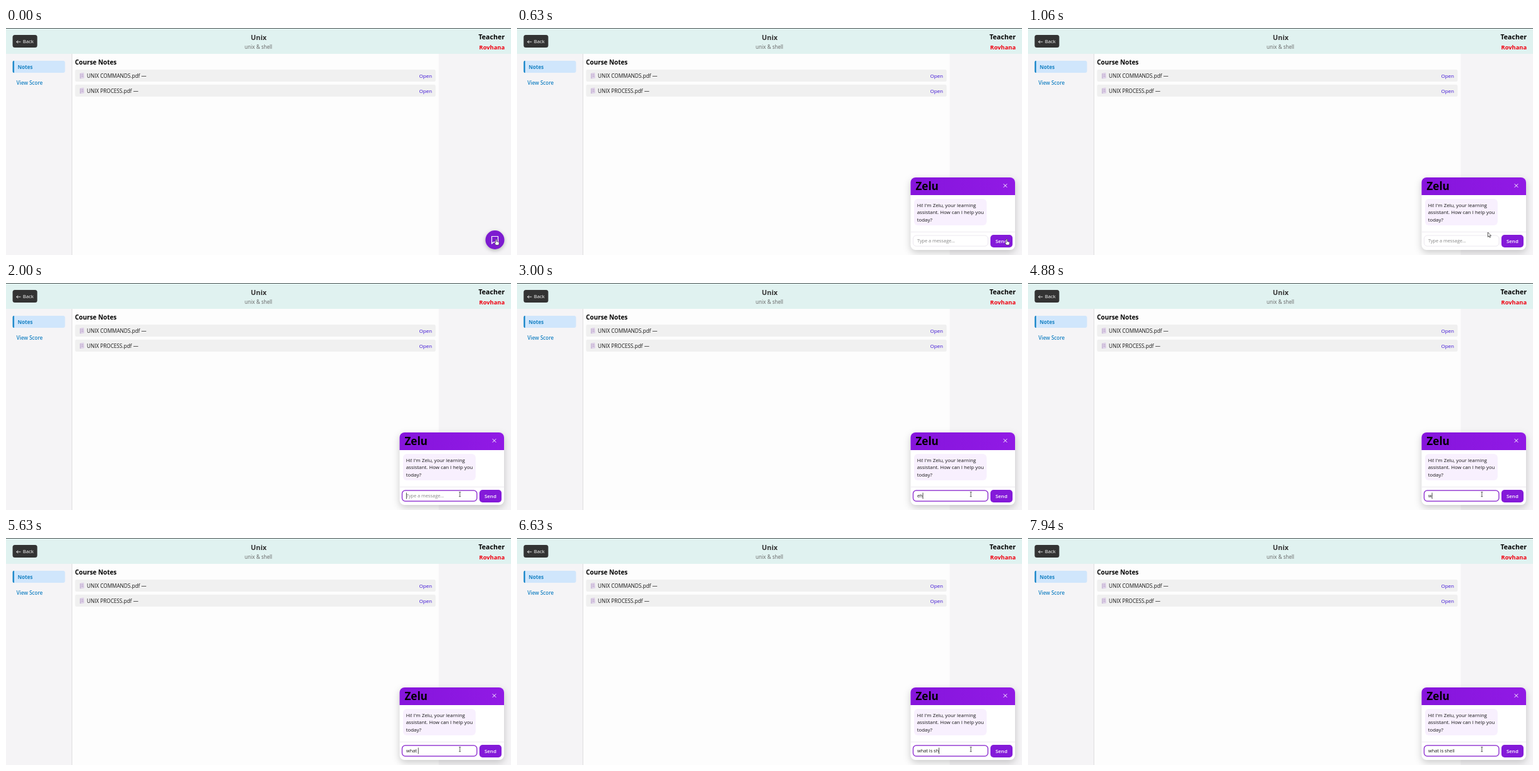
Write an HTML page that moves like this. It is 800x360 px and loops after 8000 ms.

```html
<!DOCTYPE html>
<html lang="en">
<head>
<meta charset="utf-8">
<title>Course notes with chat assistant</title>
<style>
  html, body { margin: 0; width: 100%; height: 100%; overflow: hidden; background: #fdfdfd; }
  svg { display: block; width: 100vw; height: 100vh; }
  text { font: 8.1px "Open Sans", "Noto Sans", sans-serif; fill: #161616; white-space: pre; }
  .bold { font-weight: 700; }
  .mid { text-anchor: middle; }
  .end { text-anchor: end; }
  .link { fill: #3d12d6; font-size: 8px; }
  .nav { fill: #1a83c4; font-size: 8.05px; }
  .chat { font-size: 7.86px; }
  .field { font-size: 7.35px; }
  .hint { fill: #858585; font-size: 7.3px; }
  .white { fill: #fff; }
  .line { fill: none; stroke: #fff; stroke-width: 1.2; stroke-linecap: round; stroke-linejoin: round; }
  .fab { filter: drop-shadow(0 2px 3px #0004); }
  .card { filter: drop-shadow(0 4px 6px #0003); }
  .cursor path { stroke-linejoin: round; }
</style>
</head>
<body>
<svg viewBox="0 0 800 360" preserveAspectRatio="none">
  <defs>
    <linearGradient id="bar" x2="1"><stop stop-color="#8615dc"/><stop offset="1" stop-color="#911ae5"/></linearGradient>
    <g id="note">
      <rect x="109.5" width="571" height="19" rx="2" fill="#f0f0f0"/>
      <path d="M118 5.5 l5.2 -.7 .8 8.7 -6.2 .9z" fill="#dccfe6"/>
      <path d="M117.6 6v8.2M119.5 8h3M119.5 10.5h3" stroke="#b79fc8" stroke-width=".8"/>
      <text class="link end" x="675" y="13">Open</text>
    </g>
  </defs>

  <rect width="800" height="360" fill="#fdfdfd"/>
  <path d="M0 41h104v319H0zM685.5 41H800v319H685.5z" fill="#f5f4f6"/>
  <path d="M104.5 41v319" stroke="#dedee0"/>
  <rect width="800" height="41" fill="#e0f2f0"/>
  <rect width="800" height="1" fill="#4c5554"/>

  <rect x="10.5" y="11" width="39" height="20" rx="3.5" fill="#333"/>
  <path class="line" d="M23 22h-6.3m2.2 -2l-2.2 2 2.2 2" style="stroke-width:.8"/>
  <text class="white" x="26.8" y="24.4" style="font-size:7.7px">Back</text>

  <text class="bold mid" x="400.3" y="18.7" style="font-size:10.9px;fill:#333">Unix</text>
  <text class="mid" x="400" y="33.3" style="fill:#666">unix &amp; shell</text>
  <text class="bold end" x="790" y="18.3" style="font-size:10.6px;fill:#000">Teacher</text>
  <text class="bold end" x="790" y="33.6" style="font-size:9.3px;fill:#f00010">Rovhana</text>

  <rect x="10.5" y="52" width="83" height="19" rx="3" fill="#d0e6fc"/>
  <path d="M13 52h-.5a2 2 0 0 0-2 2v15a2 2 0 0 0 2 2h.5z" fill="#238bcb"/>
  <text class="nav bold" x="18.5" y="65">Notes</text>
  <text class="nav" x="16.5" y="90" font-weight="600" style="font-weight:600">View Score</text>

  <text class="bold" x="109.3" y="58" style="font-size:9.9px;fill:#000">Course Notes</text>
  <use href="#note" y="66"/>
  <text x="128" y="79" style="font-size:8.2px">UNIX COMMANDS.pdf —</text>
  <use href="#note" y="89.8"/>
  <text x="128" y="102.6" style="font-size:8.2px">UNIX PROCESS.pdf —</text>

  <g id="launcher">
    <circle class="fab" cx="774.5" cy="336" r="15" fill="#7d1bd0"/>
    <path class="line" d="M769.5 330.5h10v9h-7l-3 2.5z"/>
  </g>

  <g id="panel">
    <rect class="card" x="623.5" y="237" width="165.5" height="115" rx="8" fill="#fff"/>
    <path d="M623.5 265v-20a8 8 0 0 1 8-8h149.5a8 8 0 0 1 8 8v20z" fill="url(#bar)"/>
    <text class="bold" x="631.5" y="256.8" style="font-size:17px;fill:#000">Zelu</text>
    <path class="line" d="M771 247.5l5 5m0 -5l-5 5" style="stroke-width:1"/>
    <rect x="629" y="271" width="115" height="42" rx="6" fill="#f8f0fe"/>
    <text class="chat" x="633.7" y="284.3">Hi! I'm Zelu, your learning</text>
    <text class="chat" x="633.7" y="295.4">assistant. How can I help you</text>
    <text class="chat" x="633.7" y="306.6">today?</text>
    <path d="M624 323.5h165" stroke="#eeeaf1"/>
    <rect id="field" x="627.5" y="329" width="118.5" height="17" rx="5" fill="#fff"/>
    <text id="hint" class="hint" x="634" y="340.4">Type a message...</text>
    <text id="typed" class="field" x="634" y="340.4"></text>
    <path id="caret" d="M.4 332.5v10" stroke="#222" stroke-width=".8"/>
    <rect x="750" y="328" width="35" height="20" rx="5" fill="#841ad9"/>
    <text class="white mid" x="767.4" y="341" style="font-weight:600;font-size:7.9px">Send</text>
  </g>

  <g class="cursor" id="hand">
    <path d="M-.8 6V.8a.9 .9 0 0 1 1.8 0v3l3 .7q.8 .3 .7 1.2l-.6 3.6H-.5L-2.6 6.3q.3-1 1.8-.3z" fill="#fff" stroke="#222" stroke-width=".6"/>
  </g>
  <g class="cursor" id="arrow">
    <path d="M0 0v7.4l1.7-1.6 1.2 2.6 1.2-.6-1.2-2.4h2.3z" fill="#fff" stroke="#222" stroke-width=".7"/>
  </g>
  <g class="cursor" id="beam">
    <path d="M-1.4 -3.5h2.8M-1.4 3.5h2.8M0 -3.5v7" fill="none" stroke="#333" stroke-width=".8"/>
  </g>
</svg>
<script>
  const LOOP = 8000, OPEN = 450, FOCUS = 1900, BLINK = 530;
  const el = id => document.getElementById(id);
  const show = (id, on) => el(id).style.display = on ? '' : 'none';

  // Pointer stops: time, x, y
  const stops = [[0, 776.5, 335], [600, 776.5, 335], [1000, 728.5, 324], [1150, 728.5, 324], [1500, 719, 335.2]];

  // Edits to the message: time and key, '<' deletes
  const keys = [[2600, 'e'], [2850, 'h'], [3500, '<'], [3650, '<']];
  const type = (text, start, step) => [...text].forEach((key, i) => keys.push([start + i * step, key]));
  type('what ', 4850, 140);
  type('is ', 5830, 160);
  type('shell', 6380, 170);

  function pointerAt(t) {
    const next = stops.findIndex(s => s[0] > t);
    if (next < 0) return stops.at(-1).slice(1);
    const [a, b] = [stops[next - 1], stops[next]];
    const p = (t - a[0]) / (b[0] - a[0]), ease = p * p * (3 - 2 * p);
    return [1, 2].map(i => a[i] + (b[i] - a[i]) * ease);
  }

  function draw() {
    const t = performance.now() % LOOP;
    const open = t >= OPEN, focused = t >= FOCUS;
    show('launcher', !open);
    show('panel', open);

    const [x, y] = pointerAt(t);
    const kind = x > 750 ? 'hand' : x < 746 && y > 329 ? 'beam' : 'arrow';
    for (const id of ['hand', 'arrow', 'beam']) {
      show(id, id === kind);
      el(id).setAttribute('transform', `translate(${x} ${y})`);
    }

    let text = '', last = FOCUS;
    for (const [time, key] of keys) {
      if (time > t) break;
      text = key === '<' ? text.slice(0, -1) : text + key;
      last = time;
    }
    el('typed').textContent = text;
    show('hint', !text);
    el('field').setAttribute('stroke', focused ? '#963fd3' : '#ece8ef');
    el('field').setAttribute('stroke-width', focused ? 1.5 : 1);
    show('caret', focused && Math.floor((t - last) / BLINK) % 2 === 0);
    const width = text && open ? el('typed').getComputedTextLength() : 0;
    el('caret').setAttribute('transform', `translate(${634 + width} 0)`);
    requestAnimationFrame(draw);
  }
  draw();
</script>
</body>
</html>
```
